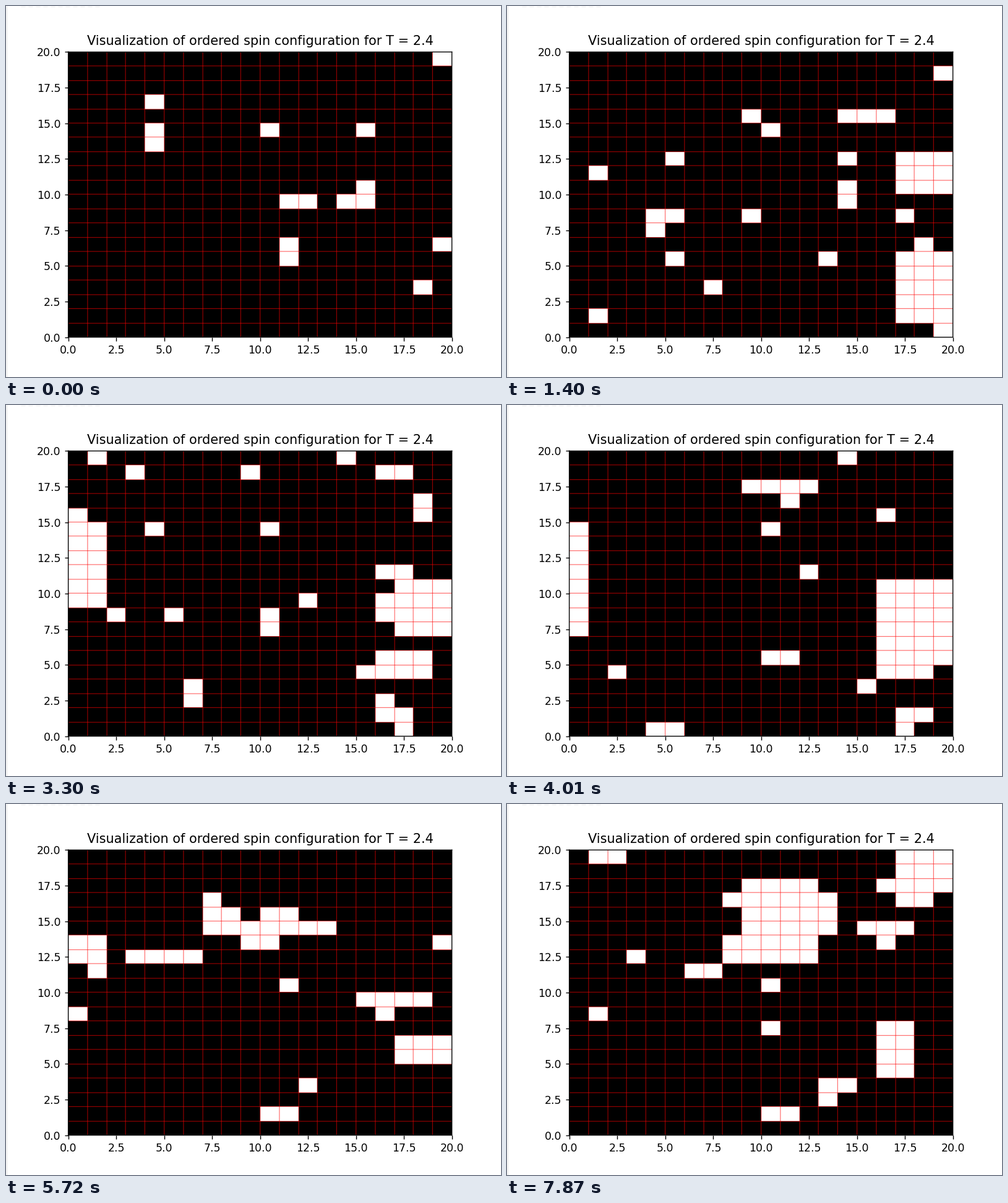
A matplotlib script that plays this animation: 800x600 px, repeating every 8 s.

```python
import matplotlib.pyplot as plt
import numpy as np
from matplotlib.animation import FuncAnimation
from matplotlib.lines import Line2D

N = 20
WIDTH, HEIGHT, DPI = 800, 600, 125
PIXEL = 72 / DPI
ZOOM = 1.25  # the plot is laid out on 640 x 480 and enlarged
LOOP, STEP = 8000, 40
FADE = 1400  # ms a droplet takes to grow or dissolve

# Drifting white droplets: key points of (ms, x, y, radius x, radius y)
DROPLETS = {
    "east": [(1400, 18.2, 11.5, 1.2, 1.6), (2570, 18.5, 10, 1.6, 2.1),
             (4010, 18, 8.3, 2.1, 2.8), (5720, 17, 9.5, 2.1, 0.8)],
    "south-east": [(1400, 18.5, 3.5, 1.6, 2.6), (2570, 16.5, 5, 1.6, 1.1),
                   (5720, 18.5, 6, 1.6, 1.1), (7100, 17.8, 2.8, 1.5, 1.1),
                   (7870, 17, 6, 1.1, 2.1)],
    "west": [(2570, 1, 12.7, 1.1, 1.7), (4010, 0.6, 11, 0.8, 4.1),
             (5720, 1, 12.7, 1.1, 1.2)],
    "centre": [(5720, 10.5, 14.5, 3.6, 0.9), (7100, 10.5, 14.5, 3.2, 2.8),
               (7870, 11, 14.8, 2.6, 2.9)],
    "north-east": [(7100, 18.6, 18.4, 1.7, 1.5), (7870, 18.7, 18.3, 1.9, 2)],
}

# One lattice change every 150, then about 230, then about 360 ms
TIMES = np.r_[0, np.linspace(100, 1170, 8), np.linspace(1400, 3300, 9),
              np.linspace(3600, 7870, 13)]


def droplet_radius(keys, t):
    """Distance of every cell from the droplet centre, 1 at its rim."""
    path = np.array(keys, float)
    ends = path[[0, -1]] * [1, 1, 1, 0, 0]
    ends[:, 0] += [-FADE, FADE]
    times, *tracks = np.vstack([ends[0], path, ends[1]]).T
    x, y, rx, ry = (np.interp(t, times, track) for track in tracks)
    rows, cols = np.mgrid[:N, :N] + 0.5
    rx, ry = max(rx, 0.01), max(ry, 0.01)
    return (((cols - x) / rx) ** 4 + ((rows - y) / ry) ** 4) ** 0.25


def touches(spins):
    return sum(np.roll(spins, shift, axis).astype(int)
               for shift in (-1, 1) for axis in (0, 1))


def evolve():
    rng = np.random.default_rng(24)
    states = []
    for t in TIMES:
        loose = rng.random((N, N)) < 0.03
        loose |= rng.random((N, N)) < 0.13 * touches(loose)
        ragged = 1 + rng.normal(0, 0.1, (N, N))
        for keys in DROPLETS.values():
            loose |= droplet_radius(keys, t) < ragged
        states.append(loose)
    return states


STATES = evolve()

# cell edges, rounded to whole pixels of the small layout
steps = np.arange(N + 1)
x_edges = np.round(24.8 * steps) * N / 496
y_edges = (np.floor(53.3 + 18.48 * steps) - 53) * N / 369

plt.rcParams["font.family"] = "DejaVu Sans"
fig = plt.figure(figsize=(WIDTH / DPI, HEIGHT / DPI), dpi=DPI, facecolor="white")
ax = fig.add_axes([80.5 / 640, 51.5 / 480, 496 / 640, 369 / 480])
mesh = ax.pcolormesh(x_edges, y_edges, STATES[0], cmap="gray", vmin=0, vmax=1)
grid_style = dict(colors="red", alpha=0.55, linewidth=ZOOM * PIXEL, snap=False)
ax.vlines(x_edges[1:-1], 0, N, **grid_style)
ax.hlines(y_edges[1:-1], 0, N, **grid_style)
ax.set(xlim=(0, N), ylim=(0, N),
       xticks=np.arange(0, N + 1, 2.5), yticks=np.arange(0, N + 1, 2.5))
ax.set_title("Visualization of ordered spin configuration for T = 2.4", pad=6.8)
for spine in ax.spines.values():
    spine.set_snap(False)


def border(x0, y0, x1, y1, color):
    fig.add_artist(Line2D([x0 / WIDTH, x1 / WIDTH],
                          [1 - y0 / HEIGHT, 1 - y1 / HEIGHT],
                          color=color, lw=PIXEL, solid_capstyle="butt"))


# faint window edge around the plot
border(0.5, 0, 0.5, HEIGHT, "#e4e4e4")
for x in range(24, 150, 12):
    border(x, 0.5, x + 7, 0.5, "#f0f0f0")
for y in (131, 147, 159):
    border(799.5, y - 1, 799.5, y + 2, "#e8e8e8")


def update(frame):
    t = frame * STEP + STEP - 1
    mesh.set_array(STATES[np.searchsorted(TIMES, t, side="right") - 1])
    return [mesh]


anim = FuncAnimation(fig, update, frames=LOOP // STEP, interval=STEP,
                     repeat=True, repeat_delay=0, blit=False)
plt.show()
```
